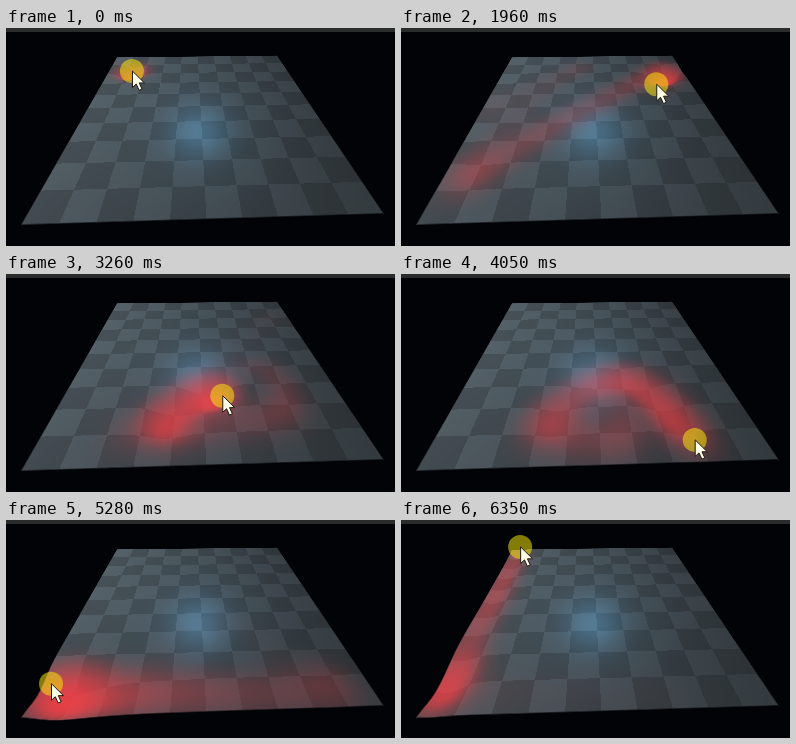
An HTML page with a canvas for the animation above (6410 ms loop, 389 by 218 pixels).

```html
<!DOCTYPE html>
<html lang="en">
<head>
<meta charset="utf-8">
<title>Soft checkered surface</title>
<style>
html, body { margin: 0; width: 100%; height: 100%; overflow: hidden; background: #020306; }
canvas { display: block; width: 100vw; height: 100vh; }
</style>
</head>
<body>
<canvas id="stage" width="389" height="218"></canvas>
<script>
const W = 389, H = 218, LOOP = 6410, CELLS = 10;
const ctx = document.getElementById('stage').getContext('2d');
const image = ctx.createImageData(W, H);

// Pointer stops, evenly spaced in time and joined by a smooth curve
const stops = [
  [126, 43], [98, 66], [86, 86], [128, 58], [182, 39], [135, 70], [62, 150],
  [140, 105], [262, 42], [226, 82], [115, 163], [245, 92], [275, 138], [155, 152],
  [208, 114], [222, 165], [142, 150], [225, 102], [316, 188], [330, 160],
  [275, 172], [190, 172], [100, 172], [46, 165], [60, 140], [45, 160],
  [40, 170], [88, 85], [126, 14]
];

const clamp = (x, lo, hi) => Math.max(lo, Math.min(hi, x));

function pointer(t) {
  const last = stops.length - 1;
  const pos = clamp(t / LOOP, 0, 1) * last;
  const i = Math.min(Math.floor(pos), last - 1), s = pos - i;
  const p = stops[i], q = stops[i + 1];
  const before = stops[Math.max(i - 1, 0)], after = stops[Math.min(i + 2, last)];
  const s2 = s * s, s3 = s2 * s;
  return [0, 1].map(k => (2 * s3 - 3 * s2 + 1) * p[k] + (3 * s2 - 2 * s3) * q[k]
    + (s3 - 2 * s2 + s) * (q[k] - before[k]) / 2 + (s3 - s2) * (after[k] - p[k]) / 2);
}

// Inverse perspective: screen position to board cells
const toBoard = (() => {
  const [x0, y0, x1, y1, x2, y2, x3, y3] = [111, 29.4, 271, 27.6, 377.3, 185.3, 15.5, 196.5];
  const dx1 = x1 - x2, dx2 = x3 - x2, dy1 = y1 - y2, dy2 = y3 - y2;
  const sx = x0 - x1 + x2 - x3, sy = y0 - y1 + y2 - y3;
  const den = dx1 * dy2 - dx2 * dy1;
  const g = (sx * dy2 - dx2 * sy) / den, h = (dx1 * sy - sx * dy1) / den;
  const a = x1 - x0 + g * x1, b = x3 - x0 + h * x3, c = x0;
  const d = y1 - y0 + g * y1, e = y3 - y0 + h * y3, f = y0;
  return (x, y, out) => {
    const w = CELLS / ((d * h - e * g) * x + (b * g - a * h) * y + a * e - b * d);
    out[0] = ((e - f * h) * x + (c * h - b) * y + b * f - c * e) * w;
    out[1] = ((f * g - d) * x + (a - c * g) * y + c * d - a * f) * w;
  };
})();

// Pressure left behind by the pointer, on a coarse grid over the board
const RES = 4, N = CELLS * RES + 1;
const field = new Float32Array(N * N);
const uv = [0, 0];

function press(t) {
  field.fill(0);
  const reach = 1.75, spread = 2 * 0.5 * 0.5;
  const first = v => Math.max(0, Math.ceil((v - reach) * RES));
  const last = v => Math.min(N - 1, Math.floor((v + reach) * RES));
  for (let age = 0; age < Math.min(1800, t + 80); age += 20) {
    toBoard(...pointer(t - age), uv);
    const [u, v] = uv;
    if (Math.min(u, v) < 0 || Math.max(u, v) > CELLS) continue;
    const rise = 1 - Math.exp(-(age + 10) / 45);
    const weight = rise * (0.5 * Math.exp(-age / 125) + 0.14 * Math.exp(-age / 480));
    for (let j = first(v); j <= last(v); j++) {
      for (let i = first(u); i <= last(u); i++) {
        const du = i / RES - u, dv = j / RES - v;
        field[j * N + i] += weight * Math.exp(-(du * du + dv * dv) / spread);
      }
    }
  }
  for (let i = 0; i < field.length; i++) field[i] = 1 - Math.exp(-field[i]);
}

function pressure(u, v) {
  const x = clamp(u * RES, 0, N - 1.001), y = clamp(v * RES, 0, N - 1.001);
  const i = x | 0, j = y | 0, fx = x - i, fy = y - j, k = j * N + i;
  return (field[k] * (1 - fx) + field[k + 1] * fx) * (1 - fy)
    + (field[k + N] * (1 - fx) + field[k + N + 1] * fx) * fy;
}

// Nearest board point that the dent has lowered to this pixel; returns its pressure
function trace(x, y) {
  const depth = 19;
  const sample = up => {
    toBoard(x, y - up, uv);
    return pressure(uv[0], uv[1]);
  };
  let h = sample(0), gap = depth * h * h, up = 0;
  while (gap > 0.05 && up < depth) {
    const old = gap;
    up++;
    h = sample(up);
    gap = depth * h * h - up;
    if (gap <= 0) return sample(up - 1 + old / (old - gap));
  }
  return h;
}

function drawBoard() {
  const px = image.data;
  for (let y = 0, k = 0; y < H; y++) {
    for (let x = 0; x < W; x++, k += 4) {
      let r = 2, g = 3, b = 6;
      if (y < 4) {
        r = 41; g = 44; b = 43;
      } else if (y > 24 && y < 212) {
        const red = 0.97 * trace(x + 0.5, y + 0.5);
        const [u, v] = uv;
        const cover = clamp(Math.min(u, CELLS - u, v, CELLS - v) * 22 + 0.5, 0, 1);
        if (cover > 0) {
          const light = (Math.floor(u) + Math.floor(v)) % 2 === 0;
          const dx = (x - 192) / 1.1, dy = y - 104, dist = dx * dx + dy * dy;
          const glow = 0.75 * Math.exp(-dist / 700) + 0.2 * Math.exp(-dist / 4500);
          const shade = (light ? 1 : 0.83) * (1.02 - 0.034 * u - 0.012 * Math.max(0, v - 5));
          const mix = (base, hot, bg) => bg + (base + (hot - base) * red - bg) * cover;
          r = mix(83 * shade + 16 * glow, 255, r);
          g = mix(94 * shade + 46 * glow, 62, g);
          b = mix(101 * shade + 66 * glow, 68, b);
        }
      }
      px[k] = r; px[k + 1] = g; px[k + 2] = b; px[k + 3] = 255;
    }
  }
  ctx.putImageData(image, 0, 0);
}

const arrow = new Path2D('M0 0V16.5L3.8 13L6.7 19.3L9.6 18L6.8 11.9H12Z');

function drawPointer(t) {
  const [x, y] = pointer(t);
  ctx.fillStyle = 'rgba(252, 236, 10, 0.52)';
  ctx.beginPath();
  ctx.arc(x, y, 12, 0, 2 * Math.PI);
  ctx.fill();
  ctx.save();
  ctx.translate(x + 0.5, y);
  ctx.fillStyle = '#fffce6';
  ctx.strokeStyle = '#1c1810';
  ctx.lineWidth = 1;
  ctx.fill(arrow);
  ctx.stroke(arrow);
  ctx.restore();
}

const start = performance.now();

function tick() {
  const t = (performance.now() - start) % LOOP;
  press(t);
  drawBoard();
  drawPointer(t);
  requestAnimationFrame(tick);
}
tick();
</script>
</body>
</html>
```
